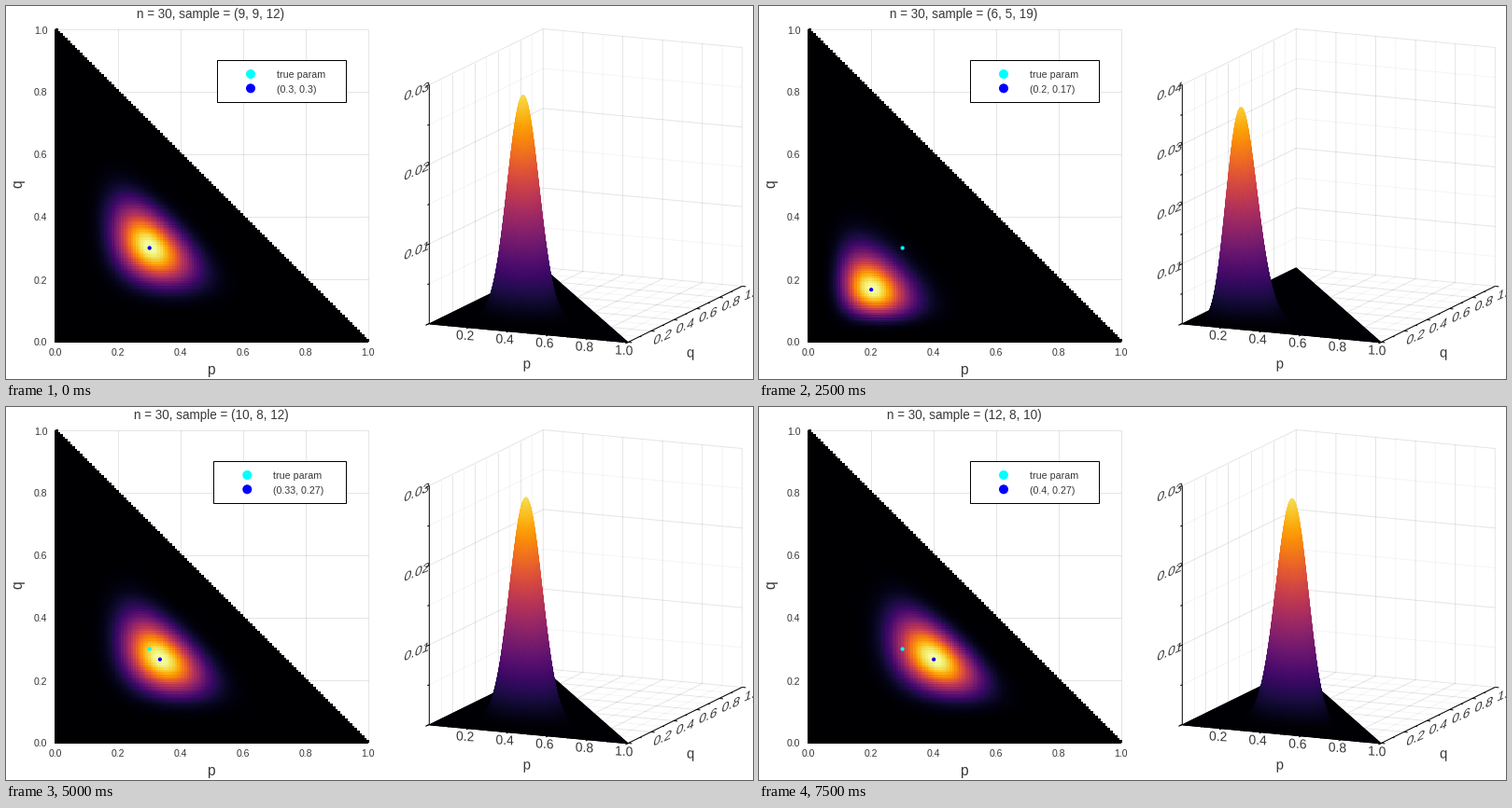
A matplotlib script that plays this animation: 800 by 400 pixels, repeating every 8 s.

```python
import math

import numpy as np
import matplotlib.pyplot as plt
from matplotlib.animation import FuncAnimation
from matplotlib.patches import Circle, PathPatch, Rectangle
from matplotlib.textpath import TextPath
from matplotlib.transforms import Affine2D
from matplotlib.tri import Triangulation

PX = 0.72  # points per pixel at 100 dpi
FONT = "Liberation Sans"
INK = "#383838"
N = 128
TRUE = (0.3, 0.3)
SAMPLES = [
    (9, 9, 12), (10, 6, 14), (9, 10, 11), (11, 10, 9),
    (6, 7, 17), (6, 5, 19), (14, 6, 10), (7, 12, 11),
    (11, 7, 12), (5, 7, 18), (10, 8, 12), (7, 6, 17),
    (9, 5, 16), (6, 9, 15), (8, 9, 13), (12, 8, 10),
]
TICKS = np.arange(0, 1.01, 0.2)

fig = plt.figure(figsize=(8, 4), dpi=100, facecolor="white")
ax = fig.add_axes([0, 0, 1, 1])
ax.set_xlim(0, 800)
ax.set_ylim(400, 0)
ax.axis("off")
inferno = plt.get_cmap("inferno")


def line(points, color="black", alpha=1.0, z=1, width=1.0):
    x, y = np.transpose(points)
    return ax.plot(x, y, color=color, alpha=alpha, lw=width * PX, zorder=z,
                   solid_capstyle="butt")[0]


def grid(points, major=True):
    return line(points, alpha=0.1 if major else 0.045)


def text(x, y, s, size, **kw):
    kw.setdefault("ha", "center")
    return ax.text(x, y, s, fontsize=size * PX, family=FONT, color=INK,
                   zorder=8, **kw)


def tilted(x, y, s, rise=0.0, slant=0.0, size=14.3):
    """Text centred on (x, y) with a sloping baseline and leaning stems."""
    path = TextPath((0, 0), s, size=size, prop={"family": FONT})
    box = path.get_extents()
    move = (Affine2D()
            .translate(-(box.x0 + box.x1) / 2, -(box.y0 + box.y1) / 2)
            + Affine2D.from_values(0.97, -rise, slant, -1, x, y))
    patch = PathPatch(move.transform_path(path), fc=INK, lw=0, zorder=8)
    return ax.add_patch(patch)


def likelihood(p, q, sample):
    a, b, c = sample
    ways = math.factorial(a + b + c) / (
        math.factorial(a) * math.factorial(b) * math.factorial(c))
    return ways * p**a * q**b * np.clip(1 - p - q, 0, 1)**c


def flat(p, q):
    return 53.2 + 335 * p, 360 - 335 * q


def project(p, q, h=0.0):
    """Screen position; h is the height as a share of the z axis."""
    return 453.3 + 213 * p + 122 * q, 340.5 + 20 * p - 60 * q - 256 * h


# Left panel
for t in TICKS:
    x, y = flat(t, t)
    grid([(x, 25), (x, 360)])
    grid([(53, y), (388, y)])
    text(x - 0.5, 375, f"{t:.1f}", 10.5)
    text(44.5, y + 4.5, f"{t:.1f}", 10.5, ha="right")
line([(53, 25), (53, 361)], z=4, width=2)
line([(52, 360), (388, 360)], z=4, width=2)
text(219, 395, "p", 15.5)
text(13, 191, "q", 15.5, va="center", rotation=90)
title = text(219.5, 13, "", 13.55)

axis = np.arange(N + 1) / N
P, Q = np.meshgrid(axis, axis)
J, I = np.mgrid[0:N + 1, 0:N + 1]
outside = I + J > N
heat = ax.imshow(np.zeros_like(P), cmap=inferno, origin="lower", aspect="auto",
                 extent=(52.75, 388.15, 360.4, 25), interpolation="nearest",
                 zorder=3)
ax.add_patch(Circle(flat(*TRUE), 2.1, fc="cyan", lw=0, zorder=5))
best = ax.add_patch(Circle(flat(*TRUE), 2.1, fc="blue", lw=0, zorder=6))

# Legend
frame_box = ax.add_patch(Rectangle((226, 58), 138, 45, fc="white", ec="black",
                                   lw=PX, zorder=6))
keys = [ax.add_patch(Circle((262, y), 5, fc=c, lw=0, zorder=7))
        for y, c in ((73, "cyan"), (88.3, "blue"))]
labels = [text(290, y, "true param", 10.6, ha="left") for y in (77, 93)]

# Right panel: grid on floor and walls, then axes
for k in range(11):
    t, major = k / 10, k % 2 == 0
    grid([project(t, 0), project(t, 1), project(t, 1, 1)], major)
    if k:
        grid([project(1, t), project(0, t)], major)
        if k < 10:
            grid([project(0, t), project(0, t, 1)], major)

line([project(0, 0, 1), project(0, 0), project(1, 0), project(1, 1)], z=5)
p_tick, q_tick = np.array([-3.0, 1.5]), np.array([4.0, 0.4])
for k in range(11):
    t, size = k / 10, 1 if k % 2 == 0 else 0.5
    a, b = np.array(project(t, 0)), np.array(project(1, t))
    line([a, a + p_tick * size], z=5)
    line([b, b + q_tick * size], z=5)
    if k and k % 2 == 0:
        tilted(a[0] - 4.3, a[1] + 8.5, f"{t:.1f}", rise=-0.06)
        tilted(b[0] + 12.5, b[1] + 6.3, f"{t:.1f}", 0.42, 0.22)
tilted(558, 386, "p", size=15.5)
tilted(733, 374, "q", size=15.5)


def z_scale(top):
    """Grid, ticks and labels of a z axis that ends at top / 100."""
    parts = []
    for k in range(2 * top + 1):
        h, major = k / (2 * top), k % 2 == 0
        x, y = project(0, 0, h)
        if k:
            parts.append(grid([project(0, 0, h), project(0, 1, h),
                               project(1, 1, h)], major))
        size = 1 if major else 0.5
        parts.append(line([(x, y), (x - 4 * size, y + 1.8 * size)], z=5))
        if k and major:
            parts.append(tilted(440, y + 6.8, f"{k / 200:.2f}", 0.42, 0.22))
    return parts


scales = {top: z_scale(top) for top in (3, 4)}

# Surface triangles inside the simplex, ordered from back to front
node = J * (N + 1) + I
low = np.stack([node[:-1, :-1], node[:-1, 1:], node[1:, :-1]], axis=-1)
high = np.stack([node[1:, 1:], node[1:, :-1], node[:-1, 1:]], axis=-1)
faces = np.concatenate([low.reshape(-1, 3), high.reshape(-1, 3)])
faces = faces[~outside.ravel()[faces].any(axis=1)]
depth = (I - J).ravel()[faces].sum(axis=1)
faces = faces[np.argsort(depth, kind="stable")]
surface = None


def draw(i):
    global surface
    sample = SAMPLES[i]
    n = sum(sample)
    p, q = sample[0] / n, sample[1] / n
    values = likelihood(P, Q, sample)
    top = math.ceil(likelihood(p, q, sample) * 100)

    title.set_text(f"n = {n}, sample = ({sample[0]}, {sample[1]}, {sample[2]})")
    heat.set_data(np.ma.array(values, mask=outside))
    heat.set_clim(0, values[~outside].max())
    best.center = flat(p, q)

    note = f"({round(p, 2)}, {round(q, 2)})"
    shift = -3.7 if len(note) > 11 else 0
    frame_box.set_x(225.9 + shift)
    frame_box.set_width(138 - shift)
    for key, label in zip(keys, labels):
        key.center = (262 + shift, key.center[1])
        label.set_x(290 + shift * 1.15)
    labels[1].set_text(note)

    for name, parts in scales.items():
        for part in parts:
            part.set_visible(name == top)
    h = values * 100 / top
    x, y = project(P, Q, h)
    if surface is not None:
        surface.remove()
    mesh = Triangulation(x.ravel(), y.ravel() + 0.4, faces)
    surface = ax.tripcolor(mesh, h.ravel(), shading="gouraud", cmap=inferno,
                           vmin=0, vmax=1, zorder=4)
    return []


anim = FuncAnimation(fig, draw, frames=len(SAMPLES), interval=500,
                     init_func=lambda: draw(0), repeat=True, repeat_delay=0,
                     blit=False)
plt.show()
```
